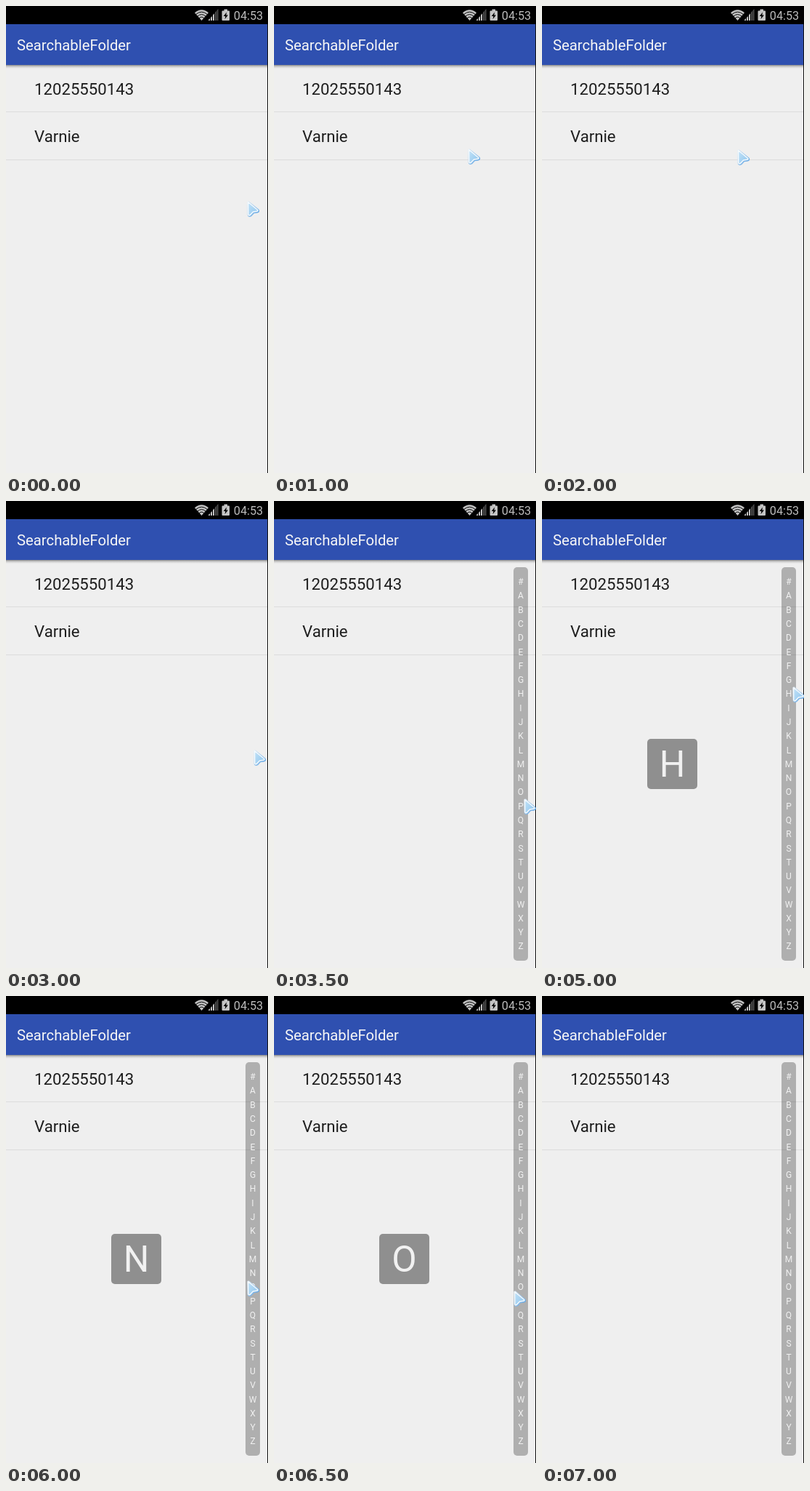
Animation of 361x642 px, one loop 7.5 s. Source, as an HTML page:

```html
<!DOCTYPE html>
<html lang="en">
<head>
<meta charset="utf-8">
<title>Letter index</title>
<style>
  html, body { margin: 0; width: 100%; height: 100%; overflow: hidden; background: #efefef; }
  svg { display: block; width: 361px; height: 642px; }
  text { font-family: Roboto, "Noto Sans", sans-serif; }
  .row { font-size: 22.2px; fill: #1e1e1e; }
  .index text { font-size: 12px; fill: #f1f1f1; text-anchor: middle; }
</style>
</head>
<body>
<svg viewBox="0 0 361 642">
  <defs>
    <linearGradient id="shade" x2="0" y2="1">
      <stop offset="0" stop-color="#8c8c8c"/>
      <stop offset=".5" stop-color="#cfcfcf"/>
      <stop offset="1" stop-color="#efefef"/>
    </linearGradient>
    <linearGradient id="ice" x2="1" y2="1">
      <stop offset="0" stop-color="#c3e2f7"/>
      <stop offset="1" stop-color="#8fc6ee"/>
    </linearGradient>
    <linearGradient id="rim" x2=".8" y2="1">
      <stop offset="0" stop-color="#d3e4f2"/>
      <stop offset="1" stop-color="#62a6e4"/>
    </linearGradient>
    <path id="arrow" d="M1.5 1.5L14.800 12.500Q15.500 14 13.500 14.300L8.500 15L4.500 19.300Q2 20.500 1.700 18.500Z"/>
  </defs>

  <rect width="361" height="642" fill="#efefef"/>
  <rect y="81" width="360" height="5" fill="url(#shade)"/>
  <rect width="361" height="25"/>
  <rect y="25" width="360" height="56" fill="#2f50b0"/>
  <rect x="360" y="25" width="1" height="617" fill="#111"/>

  <g fill="#c4c4c4">
    <path d="M269.500 20L260 9.200Q269.500 1.500 279 9.200Z"/>
    <g fill="none" stroke="#000" stroke-width="1">
      <path d="M261.500 11.600Q269.500 4.800 277.500 11.600"/>
      <path d="M263.800 14.200Q269.500 9 275.200 14.200"/>
      <path d="M266 16.800Q269.500 13.500 273 16.800"/>
    </g>
    <path d="M279 20v-1l2-2v3zM282 20v-4l2-2v6zM285 20v-7.500l2-2.300V20z"/>
    <path d="M288 20V9l2-2.300V20zM290.500 20V6l2-2v16z" fill="#4c4c4c"/>
    <path d="M300.500 4.500h4.500v2h2q1 0 1 1V19q0 1-1 1h-8.500q-1 0-1-1V7.500q0-1 1-1h2z"/>
    <path d="M304 8.500L299.700 14h2.600L301.500 18L306 12.500h-2.700z" fill="#000"/>
    <text x="313.800" y="19" font-size="16.200" fill="#bcbcbc">04:53</text>
  </g>

  <text x="15" y="61" font-size="20.300" fill="#f6f6f6">SearchableFolder</text>
  <text class="row" x="39" y="122">12025550143</text>
  <text class="row" x="39" y="187">Varnie</text>
  <path d="M0 145.500H360M0 211.500H360" stroke="#dcdcdc"/>

  <g id="index" class="index">
    <rect x="330" y="91" width="20" height="541" rx="5" fill="#000" fill-opacity=".27"/>
  </g>
  <g id="bubble">
    <rect x="145" y="327" width="69" height="69" rx="5" fill="#8f8f8f"/>
    <text id="letter" x="179.500" y="379" font-size="50" fill="#f1f1f1" text-anchor="middle"></text>
  </g>
  <g id="cursor" stroke-linejoin="round">
    <use href="#arrow" x=".6" y=".6" fill="none" stroke="url(#rim)" stroke-width="3.200"/>
    <use href="#arrow" fill="url(#ice)" stroke="#f3f9fd" stroke-width="1.600"/>
  </g>
</svg>
<script>
  const STEP = 500, LOOP = 7500, INDEX_FROM = 7;

  // Pointer position and selected letter for each step; null means no pointer.
  const steps = [
    [332, 268], [302, 251], [267, 196], [267, 193], [269, 197],
    [344, 212], [341, 342], [344, 409], [343, 396, "O"], [342, 357, "M"],
    [345, 255, "H"], [345, 254, "G"], [332, 391, "N"], [330, 405, "O"], null
  ];

  const byId = id => document.getElementById(id);
  const index = byId("index"), bubble = byId("bubble");
  const letter = byId("letter"), cursor = byId("cursor");
  const show = (node, on) => node.setAttribute("visibility", on ? "visible" : "hidden");

  [..."#ABCDEFGHIJKLMNOPQRSTUVWXYZ"].forEach((char, i) => {
    const label = document.createElementNS("http://www.w3.org/2000/svg", "text");
    label.setAttribute("x", 340);
    label.setAttribute("y", 115.2 + i * 19.28);
    label.textContent = char;
    index.append(label);
  });

  function draw(time) {
    const n = Math.floor((time % LOOP) / STEP);
    const step = steps[n];
    const [x, y, selected = ""] = step || [0, 0];
    show(index, n >= INDEX_FROM);
    show(bubble, selected);
    show(cursor, step);
    letter.textContent = selected;
    cursor.setAttribute("transform", `translate(${x} ${y})`);
  }

  const start = performance.now();
  function tick() {
    draw(performance.now() - start);
    requestAnimationFrame(tick);
  }
  tick();
</script>
</body>
</html>
```
